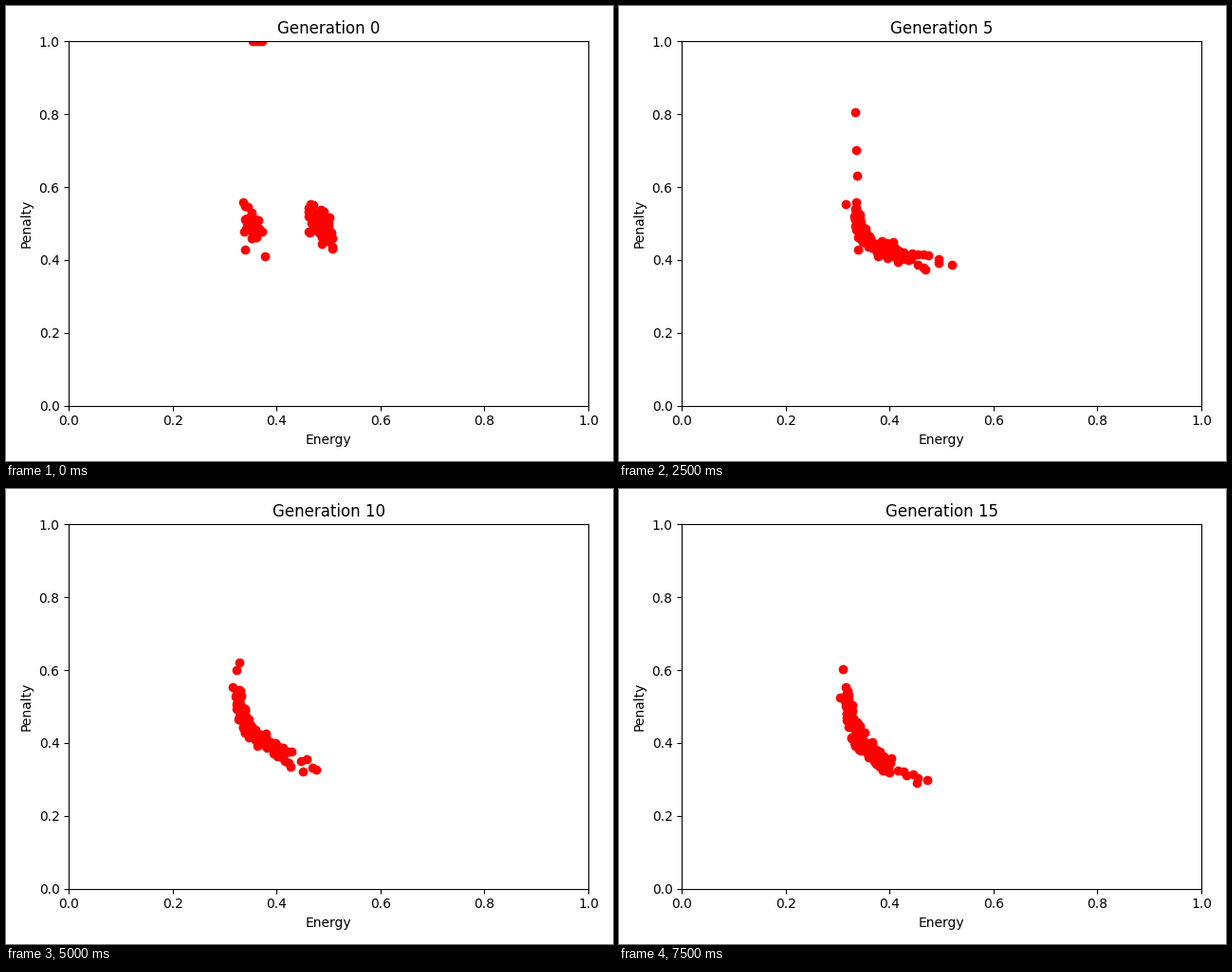
A matplotlib script for the animation above (8000 ms loop, 640 by 480 pixels).

```python
import numpy as np
import matplotlib.pyplot as plt
from matplotlib.animation import FuncAnimation

GENERATIONS = 16
FRONT, TAIL = 100, 8
SIZE = FRONT + TAIL

# The trade-off curve early on and at the end: energy, penalty.
EARLY = np.array([(.341, .545), (.345, .495), (.360, .464), (.388, .452),
                  (.415, .436), (.452, .420), (.505, .420)])
LATE = np.array([(.317, .540), (.320, .497), (.328, .452), (.342, .408),
                 (.370, .369), (.399, .333), (.462, .285)])

# Long-lived solutions away from the curve: energy, penalty, first, last.
ELITES = [
    (.336, .558, 0, 7), (.339, .428, 0, 10), (.378, .411, 0, 6),
    (.334, .806, 1, 8), (.338, .631, 2, 7), (.336, .701, 4, 7),
    (.316, .553, 3, 15), (.329, .620, 6, 10), (.520, .387, 5, 7),
    (.323, .600, 8, 11), (.310, .603, 12, 15), (.305, .525, 14, 15),
]

rng = np.random.default_rng(11)
member = np.arange(SIZE)
along = np.append(np.linspace(0, 5, FRONT), np.linspace(5.1, 6, TAIL))
jitter = rng.uniform(-1, 1, (GENERATIONS, SIZE))
life = rng.integers(1, 4, SIZE)
phase = rng.integers(0, 3, SIZE)


def blob(center, spread, count):
    """Random cluster that leans to the left at the top."""
    a, b = rng.normal(size=(2, count)).clip(-1.9, 1.9)
    return np.array(center) + np.column_stack([a, b - .5 * a]) * spread


start = rng.permutation(np.vstack([
    blob((.354, .500), (.009, .022), SIZE // 4),
    blob((.484, .492), (.012, .024), SIZE - SIZE // 4)]))
infeasible = [(x, 1) for x in np.linspace(.354, .372, 4)]


def offspring(born):
    """Place each member on the curve as it stood when it was born."""
    s = (born - 2.3) / 12
    f = s * (1.25 - .25 * s)
    shift = jitter[born, member] * np.minimum(.004 + .002 * along, .010)
    knots = np.arange(len(EARLY))
    old, new = (np.column_stack([np.interp(along, knots, c) for c in curve.T])
                for curve in (EARLY, LATE))
    spine = old + (new - old) * f[:, None]
    return spine + np.outer(shift, (1, 1.3)).reshape(SIZE, 2)


def population(gen):
    born = np.maximum(gen - (gen + phase) % life, 0)
    points = np.where(born[:, None] == 0, start, offspring(born))
    extra = [(x, y) for x, y, first, last in ELITES if first <= gen <= last]
    if gen == 0:
        extra += infeasible
    return np.vstack([points, extra])


fig, ax = plt.subplots(figsize=(6.4, 4.8), dpi=100)
dots, = ax.plot([], [], "o", color="red")
ax.set(xlim=(0, 1), ylim=(0, 1), xlabel="Energy", ylabel="Penalty")
title = ax.set_title("Generation 0")
fig.tight_layout()


def update(gen):
    dots.set_data(*population(gen).T)
    title.set_text(f"Generation {gen}")
    return dots, title


anim = FuncAnimation(fig, update, frames=GENERATIONS, interval=500,
                     repeat=True, repeat_delay=0)
plt.show()
```
